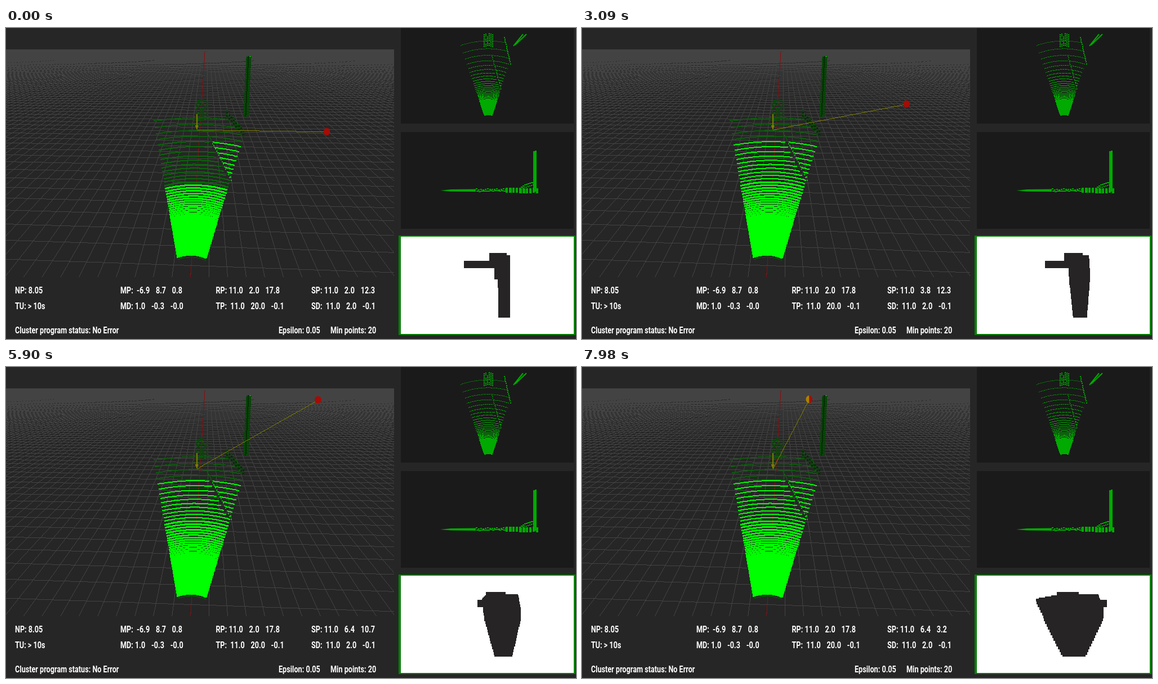
Write an HTML page with a canvas that moves like this. It is 1012x553 px and loops after 8 s.

```html
<!DOCTYPE html>
<html>
<head>
<meta charset="utf-8">
<style>
html, body { margin: 0; width: 100%; height: 100%; overflow: hidden; background: #262626; }
canvas { display: block; }
</style>
</head>
<body>
<canvas id="stage" width="1012" height="553"></canvas>
<script>
const W = 1012, H = 553, LOOP = 8000;
const ctx = document.getElementById('stage').getContext('2d');
const lerp = (a, b, u) => a + (b - a) * u;
const clamp = u => Math.max(0, Math.min(1, u));
const rnd = n => { const v = Math.sin(n * 12.9898) * 43758.5453; return v - Math.floor(v); };

function box(g, color, x, y, w, h) {
  g.fillStyle = color;
  g.fillRect(Math.round(x), Math.round(y), w, h);
}

// Camera: x is depth, h is height, z is sideways.
function project(x, h, z) {
  const dx = x + 6.9, dy = h - 8.7, dz = z - 0.8, yaw = 0.029;
  const ahead = dx - dz * yaw, side = dx * yaw + dz;
  const depth = ahead * 0.954 - dy * 0.3, up = ahead * 0.3 + dy * 0.954;
  return [345.5 + 350 * side / depth, 152.5 - 533 * up / depth];
}
const fromAbove = (x, z) => [855.2 + 7.7 * z, 172.3 - 7.7 * x];

// Hard-edged one pixel line inside the 3D view.
function pixelLine(g, color, [x0, y0], [x1, y1]) {
  const n = Math.ceil(Math.max(Math.abs(x1 - x0), Math.abs(y1 - y0)));
  g.fillStyle = color;
  for (let i = 0; i <= n; i++) {
    const x = Math.round(lerp(x0, x1, i / n)), y = Math.round(lerp(y0, y1, i / n));
    if (x >= 0 && x < 689 && y >= 38 && y < 443) g.fillRect(x, y, 1, 1);
  }
}

// Ground points of a scanner with evenly spaced beams, cut off by a wall
// and split by a seam.
const ROWS = 66, BEAMS = 50, SPREAD = 0.33;
const seam = x => 0.88 + (15.9 - x) * 0.275;
const ground = [];
for (let k = 0; k < ROWS; k++) {
  const range = 1 / (0.0514 + 0.00527 * k);
  for (let i = 0; i <= BEAMS; i++) {
    const a = lerp(-SPREAD, SPREAD, i / BEAMS);
    const x = range * Math.cos(a), z = range * Math.sin(a), gap = seam(x) - z;
    const inSeam = x > 8.3 && x < 15.9 && gap > 0 && gap < 0.3;
    if (z < 8.5 - 0.234 * x && !inSeam) ground.push({ x, z, range });
  }
}
const seamDots = Array.from({ length: 24 }, (_, i) => lerp(15.9, 8.3, i / 23)).map(x => [x, seam(x)]);

function text(g, s, x, y) {
  g.save();
  g.scale(0.79, 1);
  g.font = 'bold 16px Roboto, sans-serif';
  g.fillStyle = '#fff';
  g.fillText(s, x / 0.79, y);
  const width = g.measureText(s).width * 0.79;
  g.restore();
  return x + width;
}

function readout(g, label, values, x, y) {
  x = text(g, label, x, y);
  for (const v of values) x = text(g, v.toFixed(1), x, y) + 10.7;
}

const ROW1 = 471.5, ROW2 = 500, ROW3 = 543;

function drawLabels(g) {
  text(g, 'NP: 8.05', 16, ROW1);
  text(g, 'TU: > 10s', 16, ROW2);
  readout(g, 'MP:  ', [-6.9, 8.7, 0.8], 203, ROW1);
  readout(g, 'MD: ', [1, -0.3, -0.001], 203, ROW2);
  readout(g, 'RP: ', [11, 2, 17.8], 372.5, ROW1);
  readout(g, 'TP:  ', [11, 20, -0.1], 372.5, ROW2);
  readout(g, 'SD:  ', [11, 2, -0.1], 542, ROW2);
  text(g, 'Cluster program status: No Error', 16, ROW3);
  text(g, 'Epsilon: 0.05', 484, ROW3);
  text(g, 'Min points: 20', 576, ROW3);
}

const GREEN = '#00aa00';

function drawTopView(g) {
  box(g, '#1a1a1a', 701, 0, 307, 170);
  for (const { x, z, range } of ground) {
    const size = range > 8 ? 1 : 2;
    box(g, GREEN, ...fromAbove(x, z), size, range > 6 ? 1 : 2);
  }
  for (const p of seamDots) box(g, GREEN, ...fromAbove(...p), 2, 1);
  for (let i = 0; i < 16; i++) box(g, GREEN, 884 + i * 0.72, 16 + i * 3.1, 2, 2);
  for (let x = 848; x < 864; x += 3)
    for (let y = 9; y < 31; y += 3)
      if (rnd(x + y * 5) > 0.15) box(g, GREEN, x, y + (x - 855) ** 2 / 30, 2, 2);
  g.strokeStyle = GREEN;
  g.lineWidth = 2;
  g.beginPath();
  g.moveTo(901, 32); g.lineTo(918, 11);
  g.moveTo(904, 30); g.lineTo(924, 11);
  g.stroke();
}

function drawSideView(g) {
  box(g, '#1a1a1a', 701, 185, 307, 172);
  g.fillStyle = GREEN;
  g.beginPath();
  g.moveTo(771, 289); g.lineTo(790, 287); g.lineTo(834, 286.5);
  g.lineTo(834, 291); g.lineTo(790, 290.5);
  g.fill();
  for (let x = 834; x < 890; x += 4) {
    box(g, GREEN, x, 285 + rnd(x) * 2, 3, 2);
    box(g, GREEN, x + 1, 288 + rnd(x + 9) * 2, 4, 2);
  }
  for (let x = 887; x < 947; x += 6) box(g, GREEN, x, 283.5 + rnd(x) * 2, 4 + Math.round(rnd(x + 1)), 9);
  for (let x = 911; x < 936; x += 3) {
    const u = (936 - x) / 25;
    box(g, GREEN, x, 274 + 10 * u * u, 3, 2);
    if (x > 916) box(g, GREEN, x, 278 + 7 * u, 2, 2);
  }
  box(g, GREEN, 936, 219, 6, 72);
  box(g, GREEN, 939, 218, 3, 1);
}

function makeBackdrop() {
  const c = document.createElement('canvas');
  c.width = W; c.height = H;
  const g = c.getContext('2d');
  box(g, '#262626', 0, 0, W, H);
  for (let x = 0; x <= 110; x++) pixelLine(g, '#434343', project(x, 0, -130), project(x, 0, 130));
  for (let z = -130; z <= 130; z++) pixelLine(g, '#434343', project(0, 0, z), project(110, 0, z));
  pixelLine(g, '#8a0c0c', project(0, 0, 0), project(81, 0, 0));
  drawTopView(g);
  drawSideView(g);
  box(g, '#008000', 697, 369, 314, 177);
  box(g, '#fff', 701, 371, 307, 173);
  drawLabels(g);
  return c;
}

function drawCloud(g, s) {
  for (const { x, z, range } of ground) {
    const [px, py] = project(x, 0, z);
    const shaded = range > 7.9 && s < 0.9 && z < seam(x) && px > 268 + s * 190 && py > 200 + s * 80;
    const color = range > 14.6 ? '#0c5c0c' : shaded ? '#0a650a' : '#00ff00';
    box(g, color, px - 1, py - 1, 3, range > 8 ? 2 : 3);
  }
  for (let i = 0; i <= BEAMS; i++) {
    const a = lerp(-SPREAD, SPREAD, i / BEAMS);
    box(g, '#0a4a0a', ...project(2.43 * Math.cos(a), 0, 2.43 * Math.sin(a)), 2, 2);
  }
  for (const [x, z] of seamDots) {
    const p = project(x, 0, z);
    box(g, p[1] > 204 ? '#00c800' : '#0c5c0c', ...p, 2, 2);
  }
  // upright pole
  for (let y = 50; y < 158; y += 3) {
    const x = 426.5 - (y - 50) * 0.048;
    box(g, '#052c05', x, y, 9, 3);
    box(g, '#0a500a', x, y, 3, 2);
    box(g, '#0a500a', x + 5, y, 4, 2);
  }
  box(g, '#0c9a0c', 432, 50, 3, 2);
  // drum
  for (let x = 336; x < 360; x += 4)
    for (let y = 127; y < 165; y += 3)
      if (rnd(x * 2 + y) > 0.15) box(g, '#0b4c0b', x, y + (x - 347) ** 2 / 40, 3, 2);
  // slanted wall
  for (let i = 0; i < 8; i++)
    for (let y = 0; y < 15; y += 3)
      box(g, y % 2 ? '#052c05' : '#0a460a', 391 + i * 4.1, 146 + i * 4.7 + y, 3, 3);
}

// The ball moves in bursts, one step every 70 ms.
const STEP = 70;
const bursts = [[810, 880], [1360, 1500], [1960, 2030], [2360, 2430], [2760, 2830], [3090, 3230], [3490, 3560],
  [3760, 4360], [4560, 4630], [4830, 4960], [5360, 6110], [6180, 6950], [7020, 7790], [7850, 7980]];
const stepCount = t => bursts.reduce((n, [a, b]) => n + (t < a ? 0 : Math.floor((Math.min(t, b) - a) / STEP) + 1), 0);

// Distance travelled: RISE upwards, then on to the left.
const RISE = 4.4, END = 13.5;
const travel = [[0, 0], [1360, 0.4], [3090, 1.8], [4160, 3.4], [4960, RISE], [5900, 6], [6670, 8.7], [7980, END]]
  .map(([t, s]) => [stepCount(t), s]);

function travelled(t) {
  const n = stepCount(t);
  const i = Math.max(1, travel.findIndex(k => k[0] >= n));
  const [a, b] = [travel[i - 1], travel[i]];
  return lerp(a[1], b[1], (n - a[0]) / (b[0] - a[0]));
}

function drawSilhouette(g, s) {
  const u = Math.min(s, RISE), v = s - u;
  const span = (a, b, y, h) => box(g, '#262425', a, y, Math.round(b) - Math.round(a), h);
  const blockL = 858 - 0.9 * u - 1.2 * v;
  const topL = 867 - u * u - 1.2 * v - 0.37 * v * v, topR = 895 + 2.9 * u + v;
  const midL = 867 - 0.75 * u * u - 2 * v - 0.19 * v * v, midR = 895 + 3.8 * u + 1.6 * v;
  const botL = 874 - u - 0.7 * v - 0.11 * v * v, botR = 895 + 0.8 * u - 0.07 * v * v;
  span(813 + 5 * u + v, 895 + 2.3 * u + 2.95 * v, 414, 13);
  span(blockL, 889 - 0.2 * u - 0.65 * v, 400, 26);
  const bend = Math.min(1, 0.05 + u / 2);
  for (let y = 404; y < 515; y += y < 412 ? 2 : 5) {
    const low = clamp((y - 445) / 70);
    const shoulder = lerp(Math.max(blockL, topL), topL, clamp((y - 404) / 7));
    const flank = lerp(shoulder, midL, clamp((y - 416) / 24));
    const l = low ? lerp(midL, botL, low ** bend) : flank;
    const r = low ? lerp(midR, botR, low) : lerp(topR, midR, clamp((y - 404) / 24));
    span(l, r, y, Math.min(5, 515 - y));
  }
}

function disc(g, color, x, y, from, to) {
  g.fillStyle = color;
  g.beginPath();
  g.ellipse(x, y, 5.8, 6.7, 0, from, to);
  g.fill();
}

function drawProbe(g, s) {
  const h = 2 + Math.min(s, RISE), z = 12.3 - Math.max(0, s - RISE);
  const ball = project(11, h, z), root = project(11, 2, -0.1);
  const at = u => [lerp(root[0], ball[0], u), lerp(root[1], ball[1], u)];
  const olive = '#7d7d00';
  const mixed = s > 0.25 && s < 0.6;
  pixelLine(g, mixed ? '#9a0a06' : olive, root, ball);
  if (mixed) {
    pixelLine(g, olive, at(0.15), at(0.27));
    pixelLine(g, olive, at(0.45), at(0.58));
  }
  box(g, olive, root[0] - 0.6, 153, 2, 27);
  g.fillStyle = olive;
  g.beginPath();
  g.moveTo(root[0] - 3, 173); g.lineTo(root[0] + 3.5, 173); g.lineTo(root[0] + 0.4, 181);
  g.fill();
  disc(g, '#a50c06', ...ball, 0, Math.PI * 2);
  if (s >= END) disc(g, '#a88400', ...ball, Math.PI / 2, Math.PI * 1.5);
  readout(g, 'SP: ', [11, h, z], 542, ROW1);
}

const backdrop = makeBackdrop();

function frame(now) {
  const s = travelled(now % LOOP);
  ctx.drawImage(backdrop, 0, 0);
  drawCloud(ctx, s);
  drawProbe(ctx, s);
  drawSilhouette(ctx, s);
  requestAnimationFrame(frame);
}
requestAnimationFrame(frame);
</script>
</body>
</html>
```
